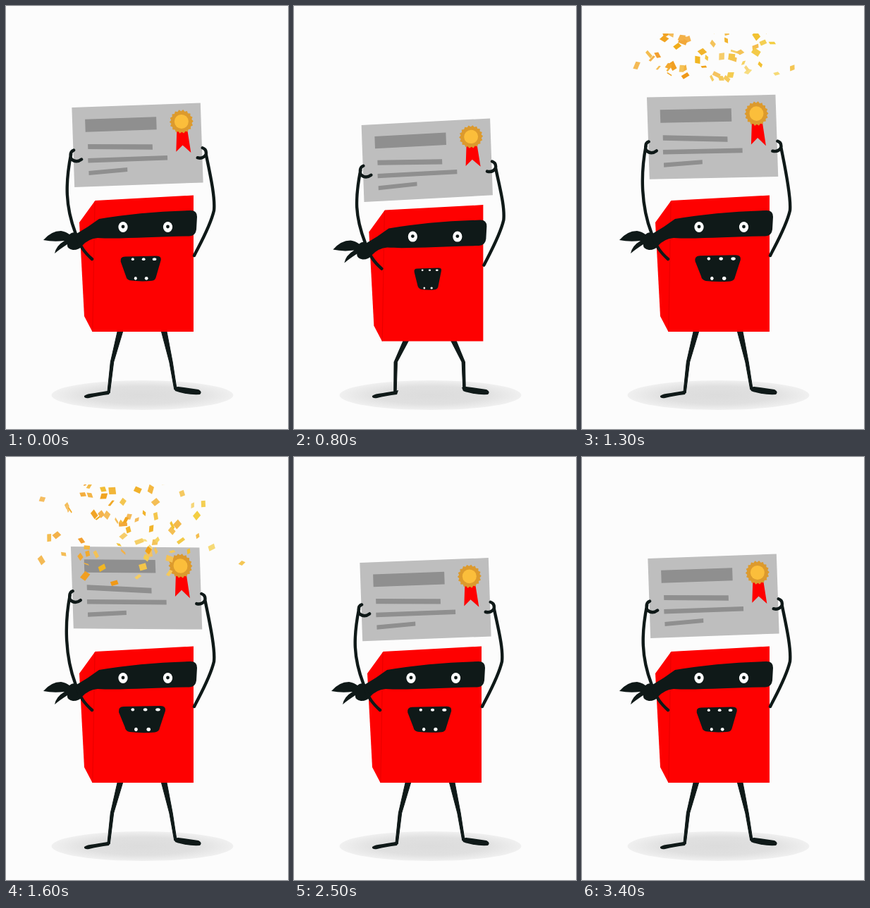
Animation, 400 px wide and 600 px high, one loop 3500 ms. Source, as an HTML page:

```html
<!DOCTYPE html>
<html lang="en">
<head>
<meta charset="utf-8">
<title>Masked box with certificate</title>
<style>
  html, body { margin: 0; width: 100%; height: 100%; overflow: hidden; background: #fcfcfc; }
  svg { display: block; width: 100%; height: 100%; }
  .ink { fill: #0f1918; }
  .limb { fill: none; stroke: #0f1918; stroke-width: 4.4; stroke-linecap: round; stroke-linejoin: round; }
</style>
</head>
<body>
<svg viewBox="0 0 400 600">
  <defs>
    <radialGradient id="shade">
      <stop offset="0" stop-color="#dcdcdc"/>
      <stop offset=".6" stop-color="#e0e0e0"/>
      <stop offset="1" stop-color="#f0f0f0"/>
    </radialGradient>
    <clipPath id="air"><rect y="39" width="400" height="561"/></clipPath>
  </defs>

  <ellipse cx="193.5" cy="552" rx="129" ry="21" fill="url(#shade)"/>

  <path id="legs" class="ink" stroke="#0f1918" stroke-linejoin="round"/>
  <path class="ink" d="M148 545L146 551Q130 553 118 556Q110 557 111 553Q114 550 126 549Q138 547 144 546Z
    M238 541L244 540Q262 542 273 544Q279 547 275 551Q256 552 240 546Z"/>

  <g id="body">
    <path fill="#fe0101" d="M126.500 276L266 268.500V462H122.500L111 440L104 307Z"/>
    <path fill="none" stroke="#dc0000" stroke-width=".7" d="M126 277L122.800 462"/>
    <path id="mouth" class="ink"/>
    <g id="teeth" fill="#fff"></g>
    <path class="ink" d="M100 323Q116 314 132 302Q190 292 262 290Q271 290 271 299L270 317Q269 326 260 326.500C210 327 160 331 130 329Q117 330 108 340Q104 346 95 346Q86 344 87 338Q76 345 69 351Q71 340 83 333Q67 335 53 332Q64 319 78 319Q85 320 90 324Q95 319 100 323Z"/>
    <g id="eyes"></g>
  </g>

  <g id="cert">
    <rect x="-91.500" y="-56.500" width="183" height="113" fill="#bebebe"/>
    <path fill="#8f8f8f" d="M-73.300 -39H28V-21H-73.300Z M-70.500 -3.800L21.300 -.2V7.300L-70.500 3.400Z
      M-71 16.200H42V22.700H-71Z M-70.500 34.200L-15.500 31.200V37.200L-70.500 40.400Z"/>
    <g transform="translate(63.600 -31)">
      <path fill="#f00" d="M-7 12L-9 42.500L.5 33.500L12 44.500L8 12Z"/>
      <path id="rosette" fill="#dc9a2d"/>
      <circle r="10" fill="#fbbe3b"/>
    </g>
  </g>

  <path id="arms" class="limb"/>
  <g id="confetti" clip-path="url(#air)"></g>
</svg>

<script>
const LOOP = 3500, STEP = 100;
const $ = id => document.getElementById(id);

function add(parent, tag, attrs) {
  const el = document.createElementNS('http://www.w3.org/2000/svg', tag);
  for (const name in attrs) el.setAttribute(name, attrs[name]);
  return parent.appendChild(el);
}

function ease(t, from, to) {
  const k = Math.min(1, Math.max(0, (t - from) / (to - from)));
  return k * k * (3 - 2 * k);
}

// Rises to 1 during the first span, returns to 0 during the second.
const pulse = (t, a, b, c, d) => ease(t, a, b) - ease(t, c, d);

function poseAt(t) {
  const crouch = pulse(t, 0, 650, 750, 1100);
  const hop = pulse(t, 750, 1080, 1080, 1200);
  const raise = pulse(t, 750, 1100, 1950, 2500);
  const tilt = pulse(t, 1100, 1600, 1800, 2500);
  const sag = pulse(t, 1950, 2500, 2600, 3300);
  const shout = pulse(t, 750, 1500, 1900, 3200);
  const drop = 15 * crouch - 9 * hop;
  return {
    drop,
    shift: 2.5 * crouch,
    mouth: 57 - 20 * crouch + 9 * shout,
    cert: {
      x: 186.5 + 2.5 * crouch - 1.4 * raise,
      y: 197.2 + drop + 9 * crouch - 11.4 * raise + 5 * sag,
      slope: -.0355 - .018 * crouch + .043 * tilt - .002 * sag,
      height: 1 - .04 * crouch + .028 * raise - .015 * sag
    }
  };
}

function random(seed) {
  return () => (seed = seed * 16807 % 2147483647) / 2147483647;
}

const rosette = Array.from({ length: 36 }, (_, i) => {
  const r = i % 2 ? 14.8 : 17, a = i * Math.PI / 18;
  return `${r * Math.cos(a)} ${r * Math.sin(a)}`;
});
$('rosette').setAttribute('d', 'M' + rosette.join('L') + 'Z');

for (const x of [166, 229.5]) {
  add($('eyes'), 'ellipse', { cx: x, cy: 313.5, rx: 6.6, ry: 7.5, fill: '#fff' });
  add($('eyes'), 'circle', { cx: x, cy: 313, r: 2.4, class: 'ink' });
}

const teeth = Array.from({ length: 5 }, (_, i) => {
  const upper = i < 3, n = upper ? i : i - 3;
  return { upper, x: (upper ? -.2 : -.13) + .27 * n, r: 2 + .4 * n, el: add($('teeth'), 'ellipse', {}) };
});

const rnd = random(90217);
const within = (min, max) => min + rnd() * (max - min);
const pieces = Array.from({ length: 75 }, () => {
  const w = within(3, 5.2), h = within(3.8, 6.2), lean = within(0, 3);
  const side = within(-1, 1);
  return {
    el: add($('confetti'), 'path', {
      d: `M${-w} ${-h + lean}L${w} ${-h}L${w} ${h - lean}L${-w} ${h}Z`,
      fill: `hsl(${41 + 4 * side + within(-3, 3)} 88% ${62 + 4 * side + within(-9, 9)}%)`
    }),
    born: within(1010, 1200),
    life: within(.65, 1.4),
    x: 188 + side * 82,
    vx: within(-160, 160),
    lift: within(40, 165),
    gravity: within(400, 760),
    angle: within(0, 360),
    spin: within(-300, 300),
    flip: within(0, 6),
    flipRate: within(4, 11)
  };
});

function drawLegs(drop) {
  const bend = drop / 13, hip = 456 + drop;
  const leg = (hx, kx, ax, ay) =>
    `M${hx - 3.6} ${hip}H${hx + 4.4}L${kx + 2.2} 505L${ax + 1.7} ${ay}H${ax - 1.7}L${kx - 2.2} 505Z`;
  $('legs').setAttribute('d',
    leg(163 - 2 * bend, 150.5 - 6 * bend, 145.5 - 2 * bend, 549) +
    leg(222.5 + bend, 234 + 6 * bend, 240.5 + bend, 544));
}

function drawMouth(w) {
  const closed = 66 - w, cx = 193 - closed * .2, s = w / 57;
  const top = 353 + closed * .18, bottom = 391 - closed * .07;
  const l = cx - w / 2, r = cx + w / 2, q = 6 * s;
  const bl = cx - w * .37, br = cx + w * .38;
  $('mouth').setAttribute('d',
    `M${l + q} ${top + 1}L${r - q} ${top}Q${r + 1} ${top} ${r} ${top + q}` +
    `L${br} ${bottom - q}Q${br - 1} ${bottom - 1} ${br - q} ${bottom - .5}` +
    `Q${cx} ${bottom + 1} ${bl + q} ${bottom - 1}Q${bl + 1} ${bottom - 2} ${bl} ${bottom - q - 1}` +
    `L${l} ${top + q + 2}Q${l - 1} ${top + 1} ${l + q} ${top + 1}Z`);
  for (const { el, upper, x, r } of teeth) {
    el.setAttribute('cx', cx + x * w);
    el.setAttribute('cy', upper ? top + 4.6 * s : bottom - 4 * s);
    el.setAttribute('rx', r * s);
    el.setAttribute('ry', (upper ? 1.9 : 2.3) * s);
  }
}

function drawArms({ shift, drop, cert }) {
  const grip = (u, v) => [cert.x + u + .034 * v, cert.y + u * cert.slope + v * cert.height];
  const [lx, ly] = grip(-80, 17.5), [rx, ry] = grip(83.5, 21);
  const at = (x, y) => `${x + shift} ${y + drop}`;
  const left = (x, y) => `${lx + x} ${ly + y}`;
  const right = (x, y) => `${rx + x} ${ry + y}`;
  $('arms').setAttribute('d',
    `M${at(122, 359)}C${at(112, 350)} ${at(105, 342)} ${at(98.5, 322)}` +
    `C${at(84, 284)} ${left(-23, 34)} ${left(-15, -7)}` +
    `M${left(-11, -13)}Q${left(-17, -11)} ${left(-15, -1)}Q${left(-8, 6)} ${left(0, 0)}` +
    `M${at(267, 354)}C${at(274, 340)} ${at(290, 312)} ${at(295, 290)}` +
    `C${at(297, 270)} ${right(18, 20)} ${right(13, -5)}` +
    `M${right(8, -14)}Q${right(14, -12)} ${right(13, -5)}Q${right(9, 2)} ${right(1, 0)}`);
}

function drawConfetti(t) {
  for (const p of pieces) {
    const age = (t - p.born) / 1000;
    const y = 128 - p.lift * (1 - Math.exp(-12 * age)) + p.gravity * age * age / 2;
    const shown = age > 0 && age < p.life && t < 2500 && y < 512;
    p.el.setAttribute('visibility', shown ? 'visible' : 'hidden');
    if (!shown) continue;
    const x = p.x + p.vx * (1 - Math.exp(-1.6 * age)) * .8;
    const turn = .2 + .8 * Math.abs(Math.cos(p.flip + p.flipRate * age));
    p.el.setAttribute('transform',
      `translate(${x} ${y}) rotate(${p.angle + p.spin * age}) scale(${turn} 1)`);
    p.el.setAttribute('opacity', Math.min(1, .3 + age * 20));
  }
}

function render(t) {
  const pose = poseAt(t), { shift, drop, cert } = pose;
  $('body').setAttribute('transform', `translate(${shift} ${drop})`);
  $('cert').setAttribute('transform',
    `matrix(.997 ${cert.slope} .034 ${cert.height} ${cert.x} ${cert.y})`);
  drawLegs(drop);
  drawMouth(pose.mouth);
  drawArms(pose);
  drawConfetti(t);
}

const start = performance.now();
function tick() {
  const t = (performance.now() - start) % LOOP;
  render(Math.floor(t / STEP) * STEP);
  requestAnimationFrame(tick);
}
tick();
</script>
</body>
</html>
```
